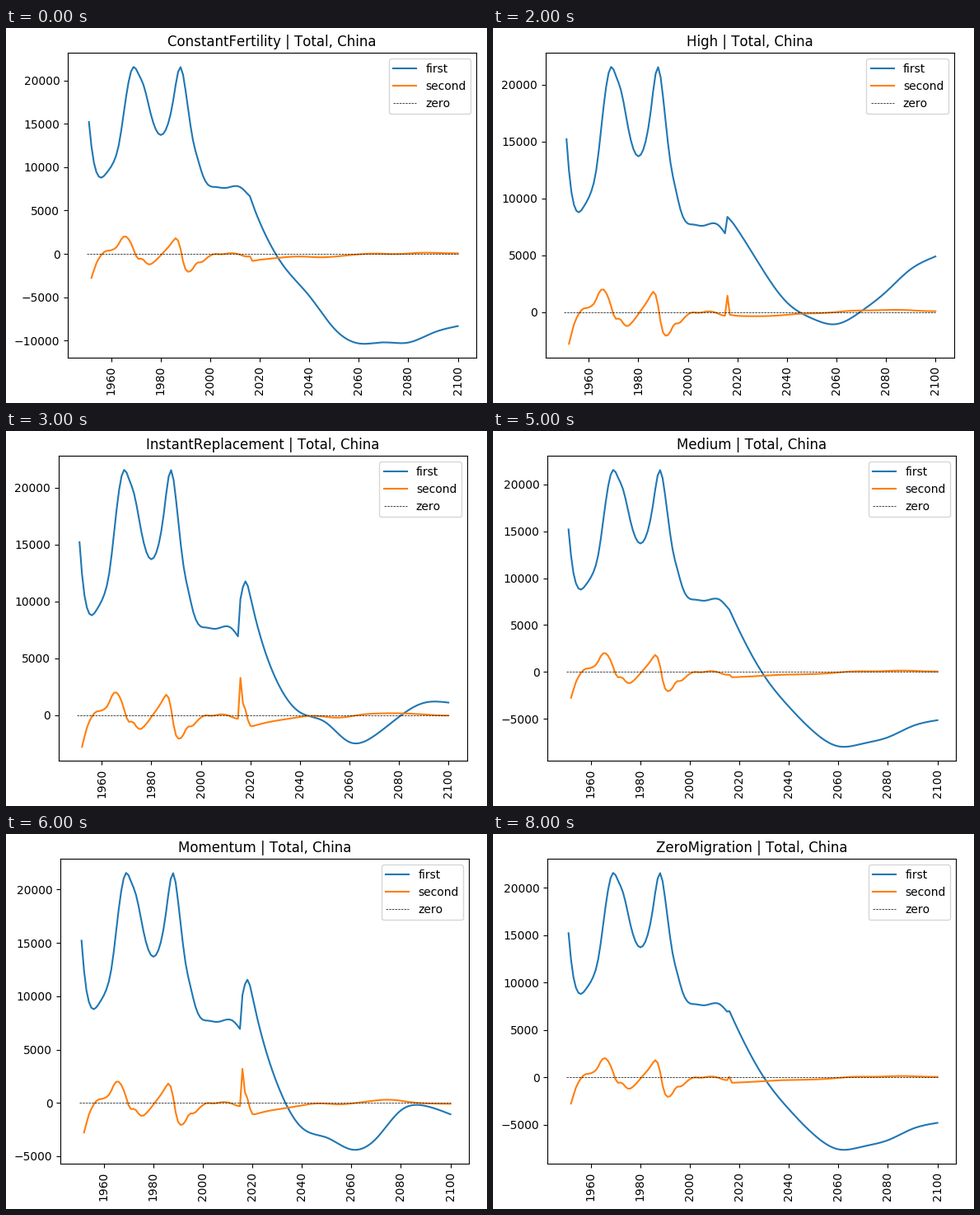
A matplotlib script for the animation above (9000 ms loop, 584x455 px).

```python
import numpy as np
import matplotlib.pyplot as plt
from matplotlib.animation import FuncAnimation

W, H, DPI = 584, 455, 100
AX_W, AX_H, AX_BOTTOM = 496, 369.6, 55
plt.rcParams["text.kerning_factor"] = 6  # whole-pixel letter spacing

PAST = np.arange(1951, 2016)
FUTURE = np.arange(2016, 2101)

# Turning points of the recorded curve
PAST_KEYS = {
    1951: 15200, 1952: 12423, 1954: 9440, 1956: 8780, 1958: 9290, 1961: 10610,
    1963: 12470, 1966: 18100, 1969: 21553, 1971: 20740, 1973: 19500,
    1976: 16100, 1979: 13870, 1982: 14280, 1985: 17630, 1988: 21530,
    1990: 18880, 1993: 13120, 1995: 10900, 1997: 9030, 2000: 7790,
    2002: 7710, 2006: 7590, 2012: 7710, 2015: 6930,
}

# Levels of each projection at the key years, in hundreds
FUTURE_KEYS = [2016, 2018, *range(2020, 2101, 10)]
LEVELS = {
    "ConstantFertility":
        [66.5, 50.5, 36.4, -15.5, -48.5, -86, -103.3, -102.1, -102.3, -91, -83.3],
    "ConstantMortality":
        [62.5, 49, 35.6, -25, -70.6, -99.2, -108.3, -97.8, -77.9, -66.5, -59.5],
    "InstantReplacement":
        [102.2, 117.6, 104.2, 33.3, 2.6, -5.7, -23.6, -18.2, -1.5, 10.8, 11.1],
    "Low":
        [48.6, 30.5, 14.5, -45, -78.8, -113.8, -134.3, -132.3, -127.4, -113, -100.2],
    "Momentum":
        [101.2, 115.4, 99.9, 18.1, -23.3, -32.5, -43.7, -33.5, -7, -2.9, -10.7],
    "ZeroMigration":
        [69.7, 58.2, 47.1, -0.6, -33.7, -60.3, -76, -73, -66.4, -54.3, -48.1],
}


def spline(x, y, xs):
    """Natural cubic spline through (x, y), sampled at xs."""
    x, y = np.array(x, float), np.array(y, float)
    n, h = len(x), np.diff(x)
    a, b = np.eye(n), np.zeros(n)
    slope = np.diff(y) / h
    for i in range(1, n - 1):
        a[i, i - 1:i + 2] = h[i - 1], 2 * (h[i - 1] + h[i]), h[i]
        b[i] = 6 * (slope[i] - slope[i - 1])
    m = np.linalg.solve(a, b)
    k = np.clip(np.searchsorted(x, xs) - 1, 0, n - 2)
    p, q = x[k + 1] - xs, xs - x[k]
    return ((m[k] * p**3 + m[k + 1] * q**3) / (6 * h[k])
            + (y[k] / h[k] - m[k] * h[k] / 6) * p
            + (y[k + 1] / h[k] - m[k + 1] * h[k] / 6) * q)


past = spline(list(PAST_KEYS), list(PAST_KEYS.values()), PAST)
curves = {name: 100 * spline(FUTURE_KEYS, levels, FUTURE)
          for name, levels in LEVELS.items()}

# The remaining projections follow from the others
medium = curves["ZeroMigration"] - 350
echo = 5200 * ((FUTURE - 2016) / 84) ** 2
curves["Medium"] = medium
curves["High"] = 2 * medium - curves["Low"] + echo
curves["NoChange"] = medium + 0.95 * (
    curves["ConstantFertility"] + curves["ConstantMortality"] - 2 * medium)
names = sorted(curves)

fig = plt.figure(figsize=(W / DPI, H / DPI), dpi=DPI, facecolor="white")
ax = fig.add_axes([0.1, 0.1, 0.8, 0.8])


def left_edge(low):
    """Room for the widest y label."""
    if low < -10000:
        return 75.15
    return 66.15 if low < -5000 else 63.7


def draw(i):
    name = names[i]
    first = np.concatenate([past, curves[name]])
    ax.clear()
    ax.plot(np.arange(1951, 2101), first, label="first")
    ax.plot(np.arange(1952, 2101), np.diff(first), label="second")
    ax.plot([1950, 2100], [0, 0], "k--", lw=0.5, label="zero")
    ax.set_title(f"{name} | Total, China")
    ax.tick_params(axis="x", rotation=90)
    ax.legend(loc="upper right")
    left = left_edge(ax.get_ylim()[0])
    ax.set_position([left / W, AX_BOTTOM / H, AX_W / W, AX_H / H])
    return ax.get_children()


anim = FuncAnimation(fig, draw, frames=len(names), init_func=lambda: draw(0),
                     interval=1000, repeat=True, repeat_delay=0)
plt.show()
```
